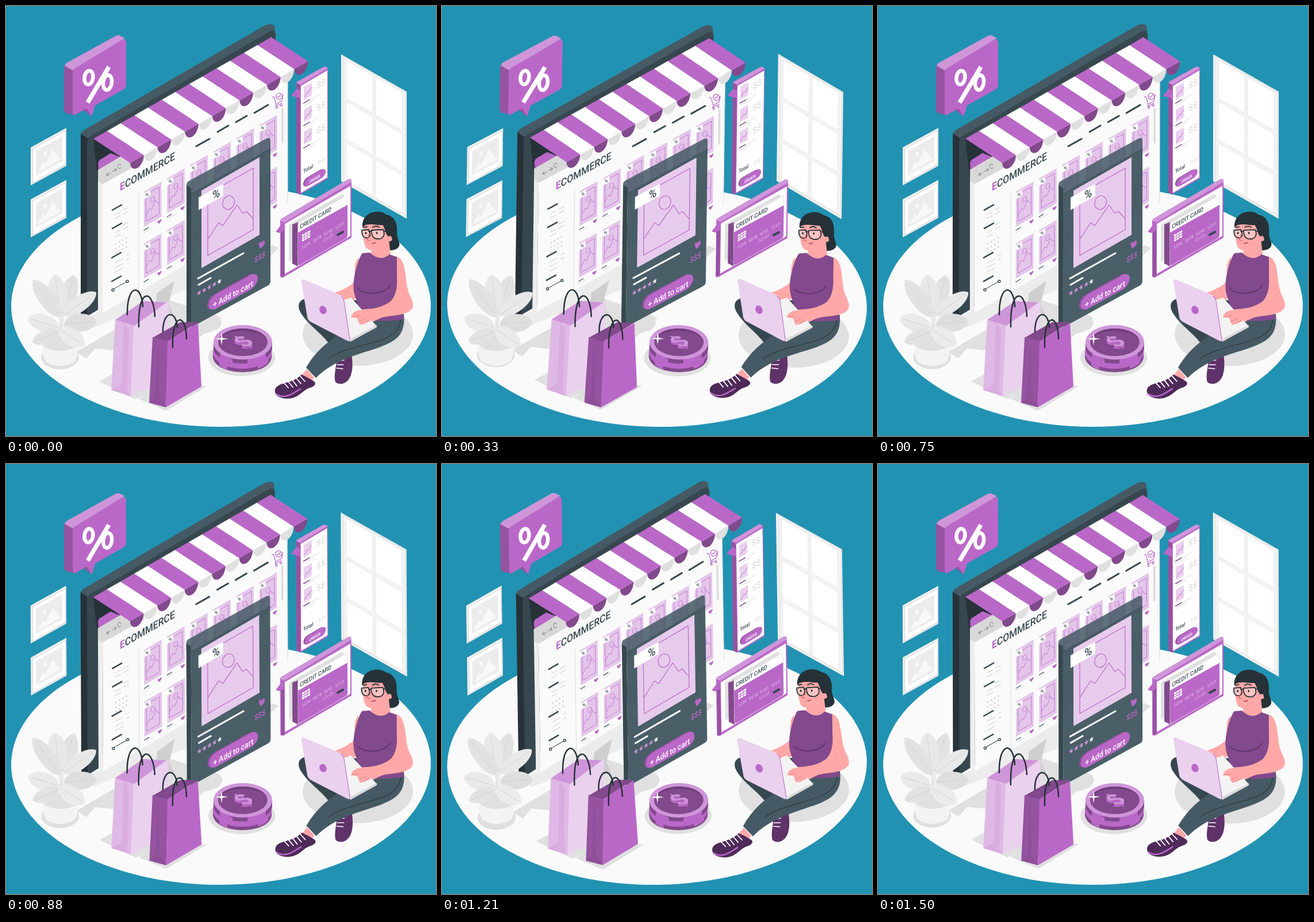
Animation of 748 by 748 pixels, one loop 1540 ms. Source, as an HTML page:

```html
<!DOCTYPE html>
<html lang="en">
<meta charset="utf-8">
<title>Ecommerce</title>
<style>
html, body { margin: 0; height: 100%; overflow: hidden; background: #2292b2; }
svg { display: block; width: 100vw; height: 100vh; font-family: Roboto, Inter, sans-serif; font-weight: 500; }
.sway { transform-box: fill-box; transform-origin: center; transform: rotate(var(--tilt, 0deg)); }
.p { fill: #ba68c8 } .pl { fill: #cf95d9 } .pp { fill: #ead1ee } .pm { fill: #9553a0 } .pd { fill: #82498c }
.w { fill: #fff } .g1 { fill: #f3f3f3 } .g2 { fill: #e0e0e0 } .g3 { fill: #cfcfcf }
.k1 { fill: #455a64 } .k2 { fill: #37474f } .k3 { fill: #263238 } .skin { fill: #ffa8a7 }
.line { fill: none; stroke: #ba68c8; stroke-linecap: round; stroke-linejoin: round }
.ink { stroke: #37474f } .gray { stroke: #dcdcdc } .white { stroke: #fff } .dark { stroke: #263238 }
</style>
<svg viewBox="0 0 748 748">
  <defs>
    <g id="tile">
      <path fill="#e4c6ea" d="M0 0h30.500v61H0z"/>
      <path class="line" stroke-width=".7" d="M4 7h22.500v47H4zM4 43l6-8 3 4 7-13 3 6 3.500 2"/>
      <ellipse class="line" stroke-width=".7" cx="15" cy="22" rx="3.500" ry="4.500"/>
      <path class="w" d="M-1 3h12v10H-1z"/>
      <text x="2.500" y="11" font-size="8" class="k2">%</text>
      <path class="line ink" stroke-width="1.300" d="M0 67h8"/>
      <path class="line gray" d="M0 71h14"/>
      <path class="p" d="M27 71q-5-4-3-6 2-1 3 1 1-2 3-1 2 2-3 6z"/>
    </g>
    <g id="picture">
      <path class="g1" d="M0 0 62-34V32L0 66z"/>
      <path class="g2" d="M2 2 62-31V31L2 64z"/>
      <path class="w" d="M4 3 60-28V29L4 61z"/>
      <path fill="#ececec" d="M9 6 55-19V24L9 49z"/>
      <path fill="#f8f8f8" d="M12 44 21 26l5 3L38 3l14 18zM24 15a3 4 0 1 1 1 0z"/>
    </g>
    <g id="item">
      <path class="pp" d="M7 9h14v22H7z"/>
      <path class="line" stroke-width=".7" d="M9 27l4-6 3 2 4-6"/>
      <text x="29" y="25" font-size="13.500" font-weight="400" fill="#d6d6d6">$$</text>
      <path class="line" style="stroke:#82498c" stroke-width="1.800" d="M7 37h10"/>
      <path class="line gray" d="M20 38h14M7 42h19"/>
    </g>
  </defs>

  <ellipse class="sway" cx="374" cy="522" rx="365" ry="210" fill="#fafafa"/>

  <g class="sway g2">
    <ellipse cx="94" cy="611" rx="33" ry="21"/>
    <path d="M122 602 280 510l95 32-60 55-100 5-60-6-15 17zM162 653l28-15 90 20-55 26zM230 683l35-20 85-2-72 43zM322 558 475 421l-12-5-141 80z"/>
    <ellipse cx="410" cy="612" rx="58" ry="32"/>
    <ellipse cx="612" cy="571" rx="96" ry="55"/>
  </g>

  <g class="sway">
    <path class="g1" d="M583 84l114 65v221L583 305z"/>
    <path class="line gray" d="M587 88v216l108 61V150z"/>
    <g id="panes" class="w" transform="translate(583 84) skewY(30)"></g>
  </g>

  <g class="sway"><use href="#picture" x="43" y="246"/><use href="#picture" x="43" y="336.500"/></g>

  <g class="sway">
    <path class="pm" d="M101 107q0-5 6-6l14 10v79l-14-3q-6-2-6-6zM133 180l16 12 5-25z"/>
    <path class="pl" d="M102 104q1-4 7-7l82-45q5-2 8 0l8 4-91 56z"/>
    <path class="p" d="M116 116q0-6 6-9l80-48q7-3 7 4v74q0 6-6 9l-48 27-6 19-9-14-17 10q-7 4-7-3z"/>
    <g class="line white" stroke-width="6.500">
      <ellipse cx="144" cy="124.500" rx="7.500" ry="12" transform="rotate(8 144 124)"/>
      <ellipse cx="176.500" cy="133" rx="7.500" ry="13" transform="rotate(8 176 133)"/>
      <path stroke-linecap="butt" stroke-width="7.500" d="M142 168l37-62"/>
    </g>
  </g>

  <g class="sway">
    <path fill="#ececec" d="M136 543l29-12 180-100v50L152 560z"/>
    <path class="g2" d="M150 590l125-72 92 20q16 12 0 25l-60 20z"/>
    <path class="g3" d="M262 500l31-22-10 40 8 18-32 10z"/>
    <path class="k1" d="M130 225q0-6 7-10L450 34q10-5 17 0l2 20-320 185z"/>
    <path class="k3" d="M130 222l12 8v309l-12 2z"/>
    <path class="k2" d="M141 238q0-8 6-12L457 45q12-6 12 6v290L141 540z"/>
    <path class="k3" d="M152 231l60 38-52 35z"/>
    <path class="pd" d="M160 276l8 4v14l-8-5z"/>
    <path class="p" d="M160 274q1-6 6-8l16-10 20 8v20l-38 6z"/>
    <path fill="#ededed" d="M160 285l8 4v245l-8-4z"/>
    <path fill="#fafafa" d="M168 285 490 99v242q0 6-5 9L168 534z"/>
    <path fill="#d8d8d8" d="M160 285 240 238v32l-72 40-8-5z"/>
    <path class="line" style="stroke:#888" d="M175 294l7-4m-7 4 2-4m-2 4 4 1M185 288l7-4m-3-1 3 1-2 4M200 277a3 4 0 1 0 0 4"/>
    <text transform="matrix(.866 -.5 0 1 198 322)" font-size="18.300" class="k2"><tspan class="p" font-weight="700">E</tspan>COMMERCE</text>
    <path class="line ink" stroke-width="3" d="M331 244l23-13M368 219l19-11M400 202l19-11M432 186l24-14"/>
    <g class="line" stroke-width="1.200">
      <path d="M463 158l3 0 4 13 10-6 2-11M470 171l-1 4 11-6"/>
      <circle cx="475" cy="157" r="5.500"/><path d="M472 157l2 2 4-5"/>
      <circle cx="471" cy="177" r="1.500"/><circle cx="479" cy="173" r="1.500"/>
    </g>
    <path class="line gray" stroke-width="3.500" d="M481 179v58"/>
    <path class="line gray" d="M231 321v178M490 115v228"/>
    <path class="line ink" stroke-width="2.500" d="M185 355l16-9M185 387l16-9M184 438l16-9M184 479l16-9"/>
    <path class="line gray" stroke-width="1.500" d="M190 363l9-5m5-3 9-5M190 370l9-5m5-3 9-5M190 395l9-5m5-9 9-5M190 402l9-5m5-9 9-5M190 447l13-7m6-6 5-3M190 455l13-7m6-6 5-3M190 463l13-7"/>
    <path class="line gray" stroke-width="3.500" stroke-dasharray="0 7" d="M191 414l24-14M191 422l24-14M191 430l24-14"/>
    <path class="line ink" stroke-width="1" d="M186 493l25-14"/>
    <g class="w" stroke="#37474f" stroke-width="1.500"><circle cx="186" cy="494" r="2"/><circle cx="211" cy="479" r="2"/></g>
    <g id="tiles"></g>
    <g id="awning"></g>
  </g>

  <g class="sway">
    <path class="p" d="M505 135q0-3 4-5l45-25 6 3v192l-49 28-6-4z"/>
    <path class="pl" d="M505 133l49-28 6 3-48 29z"/>
    <path class="pm" d="M505 134l7 4v190l-7-4z"/>
    <path class="p" d="M496 156l10-12 7 4v13l-7-2z"/>
    <path class="w" d="M513 139l46-27v186l-46 27z"/>
    <g transform="translate(511 136) skewY(-30)"><use href="#item"/><use href="#item" y="39"/><use href="#item" y="78"/></g>
    <text transform="matrix(.866 -.5 0 1 517 291)" font-size="9" class="k2">Total</text>
    <text transform="matrix(.866 -.5 0 1 543 276)" font-size="8" fill="#dcdcdc">$$$</text>
    <g transform="translate(517 302) skewY(-30)"><rect class="pd" width="36" height="15" rx="7.500"/><rect class="p" x="2" y="1" width="37" height="15" rx="7.500"/></g>
    <text transform="matrix(.866 -.5 0 1 527 309)" font-size="7.200" class="w">ORDER</text>
  </g>

  <g class="sway">
    <path class="pl" d="M477 371l117-69q4-3 7 0v6L485 376z"/>
    <path class="p" d="M477 372l8 4 116-70v97L484 471q-4 3-7 0z"/>
    <path class="p" d="M469 393l13-17 6 5v16l-11-2z"/>
    <path class="pm" d="M478 394l6-4v81l-6-1z"/>
    <path class="w" d="M485 379l114-66v87l-114 66z"/>
    <path class="g2" d="M492 384q0-4 4-6l87-50q5-2 5 3v58l-96 56z"/>
    <path class="pd" d="M498 380l10-4v77l-10-5z"/>
    <path class="w" d="M508 378l82-47q4-2 4 2v66q0 3-3 5l-79 46q-4 2-4-2z" stroke="#e0e0e0"/>
    <path class="p" d="M508 394l86-48v53q0 3-3 5l-79 46q-4 2-4-2z"/>
    <text transform="matrix(.866 -.5 0 1 511 388)" font-size="10.300" class="k2">CREDIT CARD</text>
    <path class="w" d="M515 398l14-8v12l-14 8z"/>
    <path class="line" d="M515 402l14-8m-14 12 14-8m-10-3v12m5-14v12"/>
    <g class="pp" style="font-family: 'Noto Sans Mono', monospace" font-weight="400">
      <text transform="matrix(.866 -.5 0 1 514 423)" font-size="7.500">1234 5678 9191 1213</text>
      <text transform="matrix(.866 -.5 0 1 551 411)" font-size="7">12/23</text>
    </g>
    <path class="line ink" stroke-width="4" d="M577 398l9-5"/>
  </g>

  <g class="sway">
    <path class="k1" opacity=".85" d="M314 310q0-3 3-5l137-75q6-2 6 4v18L322 330l-8-5z"/>
    <path class="k2" d="M314 312l8 5v241q-8 0-8-8z"/>
    <path class="k1" opacity=".97" d="M322 326l138-79v232q0 4-4 7L326 557q-4 2-4-2z"/>
    <path fill="#e7cbec" d="M340 321l101-58v135l-101 58z"/>
    <g class="line" stroke-width="1.200">
      <path d="M351 327l79-45v107l-79 45zM351 406l19-29 7 5 25-36 10 15 6-4 12 13"/>
      <ellipse cx="387" cy="342" rx="10" ry="12" transform="rotate(20 387 342)" fill="#e7cbec"/>
    </g>
    <path class="w" d="M335 333l43-24v21l-43 25z"/>
    <text transform="matrix(.866 -.5 0 1 359 338)" font-size="21" class="k2">%</text>
    <path class="p" d="M443 422q-5-7-2-11 3-2 4 1 2-6 5-3 2 5-7 13z"/>
    <text transform="matrix(.866 -.5 0 1 432 447)" font-size="13" class="p">$$$</text>
    <path class="line white" stroke-width="3" d="M334 474l79-44M335 485l21-12"/>
    <g id="stars"></g>
    <g transform="translate(350 508) skewY(-29)"><rect class="pm" width="85" height="25" rx="12.500"/><rect class="p" x="3" y="2" width="85" height="25" rx="12.500"/></g>
    <text transform="matrix(.866 -.47 0 1 360 525)" font-size="14" class="w">+ Add to cart</text>
  </g>

  <g class="sway">
    <path class="g1" d="M63 585q0 25 7 34 24 14 49 0 7-9 7-34z"/>
    <ellipse class="g2" cx="94.500" cy="585" rx="31.500" ry="15"/>
    <g id="leaves" stroke="#cfcfcf" stroke-width=".8"></g>
  </g>

  <g class="sway">
    <path class="pl" d="M190 546l49-33 44 3-61 43z"/>
    <path fill="#dfb9e5" d="M190 546l33 10-6 123-34-11z"/>
    <path class="pp" d="M222 557l61-44-2 136-64 30z"/>
    <path fill="#d5a6dc" d="M183 668l18-10 16 21zM205 552l-4 106 10 12 3-108z" opacity=".6"/>
    <path class="pd" d="M255 577l48-27 31 0-54 34z"/>
    <path class="pm" d="M255 576l27 8-4 114-29-8z"/>
    <path class="p" d="M281 583l53-32 6 111-62 36z"/>
    <path class="pd" d="M249 690l16-12 13 20zM265 580l2 97-7 5z" opacity=".4"/>
    <path class="line dark" stroke-width="2.500" d="M211 537c-1-54 25-55 27-14M231 558c-2-70 26-66 28-18M273 567c-1-37 23-40 25-8M290 594c-2-60 23-62 24-15"/>
  </g>

  <g class="sway">
    <path class="pd" d="M360 600v11c4 34 98 35 102 0v-12z"/>
    <ellipse class="p" cx="411" cy="602" rx="51" ry="29"/>
    <path class="pd" d="M361 585v11c4 34 98 35 102 0v-11z"/>
    <path class="p" d="M372 604v11q9 8 22 11v-11zM420 615v12q22-1 32-13v-11zM371 625q7 6 14 8v-11l-14-7zM438 620v11q12-4 18-11v-10z"/>
    <ellipse class="pl" cx="412" cy="585" rx="51" ry="30"/>
    <ellipse class="pd" cx="412" cy="585" rx="43" ry="24"/>
    <path fill="#703e78" d="M369 585a43 24 0 0 1 86 0 43 20 0 0 0-86 0z"/>
    <g font-size="37" font-weight="700" text-anchor="middle">
      <text transform="matrix(.866 -.5 .866 .5 424 594)" class="p">$</text>
      <text transform="matrix(.866 -.5 .866 .5 424 590)" class="pl">$</text>
    </g>
    <path class="w" d="M375 568l1.500 9.500 10 1.500-10 1.500-1.500 9.500-1.500-9.500-10-1.500 10-1.500z"/>
  </g>

  <g class="sway">
    <path class="k3" d="M620 384c-1-26 28-32 42-21 15 3 19 16 18 30-1 12 8 20 3 26-5 8-24 8-30 0z"/>
    <path class="k2" d="M614 512l-92-3c-14 2-16 14-9 25 13 22 43 40 53 60l8 15 24-8 10-70z"/>
    <path fill="#5f3269" d="M575 604q12 6 25-4c3 15 4 30 0 42-6 17-21 18-27 12-4-13 4-32 2-50z"/>
    <path class="line white" stroke-width="1.500" d="M577 611l11-2m-11 8 11-1m-12 8 11 0m-12 6 11 1"/>
    <path class="k1" d="M610 526l82 10c4 38-16 48-46 59-36 12-76 21-107 52l-17-18c15-26 36-45 59-58z"/>
    <path class="line dark" stroke-width="1" d="M687 545c-4 30-32 36-62 44-26 7-50 13-65 25M610 526c-20 4-50-2-65-3"/>
    <path class="skin" d="M523 632l13 14-8 10-15-12z"/>
    <path fill="#4e2a59" d="M514 641q11 5 22 12c5 5-1 9-7 11-14 4-18 18-39 19-15 0-24-7-22-16 5-14 29-8 46-26z"/>
    <path class="line" stroke="#9553a0" stroke-width="2.500" d="M470 675c15 10 29-1 42-9"/>
    <path class="line white" stroke-width="1.800" d="M510 642l10 11m-17-8 10 12m-17-9 10 13m-17-10 10 12m-17-9 9 10"/>
    <path class="skin" d="M613 437c-9 13-6 29-6 42-10 10-25 17-42 22l-8 12q20 8 43 0 15-7 19-18zM638 405h28l3 29q-16 17-35 3z"/>
    <path class="pd" d="M633 429q18 17 34 3l14 5c12 27-2 63 11 108q-42 7-82-3c8-29-9-34-5-64 2-18 9-41 15-48z"/>
    <path class="line" style="stroke:#63366b" stroke-width="2" d="M612 492c16 12 46 10 56-6"/>
    <path class="skin" d="M680 436c15 5 14 31 18 53 3 16 10 21 10 32-1 15-28 17-45 19-16 2-23 11-37 14-10 0-14-7-16-13l-10 1c-2-8 9-13 16-14 18-1 34-2 50-12 13-9 15-29 14-44z"/>
    <path class="skin" d="M623 379c7-12 34-10 39 4l3 12c10-4 14 3 9 10-4 5-8 5-10 4-5 15-30 21-38 11-5-10-6-28-3-41z"/>
    <path class="k3" d="M620 384c0-22 25-31 42-21 15 4 19 18 18 32 0 8-4 15-9 18 2-11-1-15-6-12-6-6-5-14-10-20-12 1-24-5-35 3z"/>
    <g class="line dark" stroke-width="1.800">
      <path fill="#ffc4c2" d="M619 390l12-1q5 12-2 14-10 2-10-13zM636 390l20-1q5 12-5 16-16 2-15-15zM631 392h5m21 0 12-2"/>
      <path d="M622 385l6-1m10 1q6-4 11 0"/>
    </g>
    <ellipse class="k3" cx="626" cy="395" rx="1.500" ry="2"/><ellipse class="k3" cx="645" cy="395" rx="1.500" ry="2"/>
    <path class="line" style="stroke:#e56f78" stroke-width="1.500" d="M632 397l-4 10 5 1"/>
    <path fill="#a33b51" d="M634 412q6 1 10-2-2 6-10 2z"/>
    <path class="g1" d="M579 515l21-8 45 50-46 27z"/>
    <path fill="#d9d9d9" d="M599 579l46-24v4l-46 25z"/>
    <path class="pp" d="M514 480q-1-6 5-4l61 26q6 3 8 9l11 68q0 6-6 3l-62-32q-6-3-7-9z"/>
    <path class="line" stroke="#cf95d9" stroke-width="1" d="M583 505q4 2 5 8l10 67"/>
    <ellipse class="p" cx="551.500" cy="529" rx="6" ry="7.500" transform="rotate(-25 551 529)"/>
    <path class="skin" d="M600 541q4-12 18-12l18 2-2 17-18 7-5-12z"/>
    <path class="line" style="stroke:#e98287" stroke-width="1" d="M601 541l13-2m-1 11 12-7m-3 10 10-6"/>
  </g>
</svg>
<script>
const LOOP = 1540, STEPS = 37;
const range = n => [...Array(n).keys()];
const fill = (id, parts) => document.getElementById(id).innerHTML = parts.join('');

fill('panes', range(6).map(i =>
  `<rect x="${9 + i % 2 * 51}" y="${5 + (i >> 1) * 72}" width="46" height="66" stroke="#e4e4e4" stroke-width=".8"/>`));

fill('tiles', range(12).map(i => {
  const col = i % 6, row = i / 6 | 0;
  return `<use href="#tile" transform="translate(${240 + 40.2 * col} ${323 - 23.2 * col + 90 * row}) skewY(-30)"/>`;
}));

fill('awning', range(13).map(i => {
  const x = 152 + 23.8 * i, y = 231 - 13.6 * i, odd = i % 2;
  return `<path class="${odd ? 'g2' : 'pd'}" d="M${x + 64} ${y + 42}c1 18 22 11 23.800-13.600z"/>
    <path class="${odd ? 'w' : 'p'}" d="M${x} ${y}l23.800-13.600 64 42-23.800 13.600z"/>`;
}));

fill('stars', range(5).map(i =>
  `<path class="${i < 4 ? 'pl' : 'w'}" transform="translate(${336 + 8.8 * i} ${499 - 5 * i}) skewY(-30)"
    d="M0-4.500 1-1.500h3L1.600.8l1 3.500L0 2.200l-2.600 2.100 1-3.500L-4-1.500h3z"/>`));

// A leaf from its base to its tip, with a mid vein
const leaf = ([x, y, tipX, tipY, width, color]) => {
  const dx = tipX - x, dy = tipY - y, k = width / Math.hypot(dx, dy);
  const at = (along, side) => `${x + dx * along - dy * k * side} ${y + dy * along + dx * k * side}`;
  return `<path fill="none" d="M94 580Q${x} ${y + 8} ${x} ${y}"/>
    <path fill="${color}" stroke="none" d="M${x} ${y}C${at(.1, 1)} ${at(.85, 1)} ${tipX} ${tipY}C${at(.85, -1)} ${at(.1, -1)} ${x} ${y}"/>
    <path fill="none" d="M${x} ${y}L${at(.9, 0)}"/>`;
};
fill('leaves', [
  [98, 536, 119, 468, 20, '#e2e2e2'], [94, 534, 85, 467, 22, '#e8e8e8'],
  [95, 541, 47, 476, 19, '#e2e2e2'], [100, 538, 157, 498, 18, '#e8e8e8'],
  [101, 553, 158, 549, 21, '#dedede'], [92, 560, 38, 543, 20, '#e9e9e9'],
  [94, 566, 46, 585, 16, '#e2e2e2'], [92, 562, 137, 590, 20, '#ebebeb']
].map(leaf));

// Swing to +1 degree at a quarter of the loop and to -1 at three quarters
const swing = p => p < .25 ? 4 * p : p < .75 ? 2 - 4 * p : 4 * p - 4;

const svg = document.querySelector('svg'), start = performance.now();
function draw() {
  const phase = (performance.now() - start) % LOOP / LOOP;
  svg.style.setProperty('--tilt', swing(Math.floor(phase * STEPS) / STEPS) + 'deg');
  requestAnimationFrame(draw);
}
draw();
</script>
</html>
```
